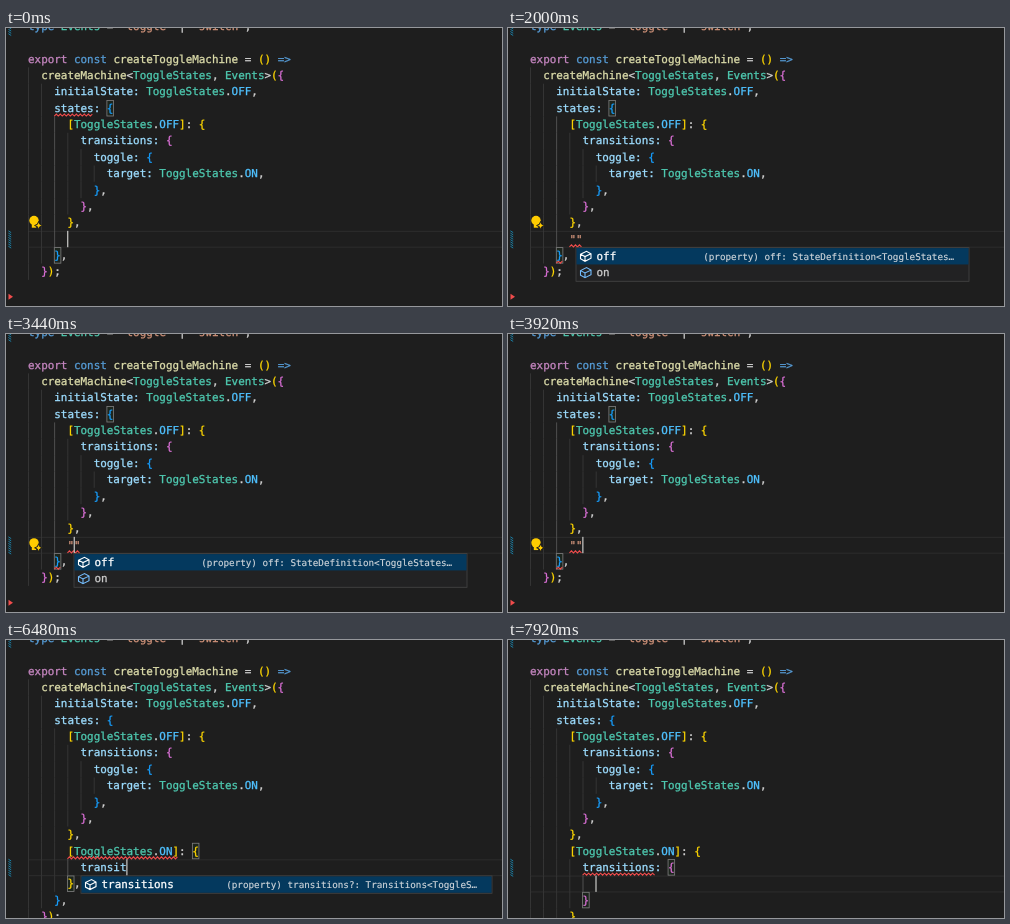
An HTML page that plays this animation: 496 px wide and 278 px high, repeating every 8 s.

```html
<!DOCTYPE html>
<html lang="en">
<head>
<meta charset="utf-8">
<title>Toggle machine editor</title>
<style>
  html, body { margin: 0; width: 100%; height: 100%; overflow: hidden; background: #1e1e1e; }
  svg { display: block; width: 496px; height: 278px; }
  text { font: 10.92px "DejaVu Sans Mono", monospace; white-space: pre; text-rendering: geometricPrecision; }
  text, tspan { fill: currentColor; stroke: currentColor; stroke-width: .3px; }
  .detail { font-size: 9.28px; text-anchor: end; stroke-width: .15px; }
</style>
</head>
<body>
<svg id="stage" viewBox="0 0 496 278"></svg>
<script>
const LOOP = 8000, LEFT = 22, TOP = 23, CHAR = 6.575, LINE = 16.35, BASELINE = 11.7, EDIT_ROW = 11;
const BRACKETS = ["#ffd700", "#da70d6", "#179fff"];
const COLORS = {
  export: "#c586c0", const: "#569cd6", type: "#569cd6", "=>": "#569cd6",
  createToggleMachine: "#dcdcaa", createMachine: "#dcdcaa",
  ToggleStates: "#4ec9b0", Events: "#4ec9b0", OFF: "#4fc1ff", ON: "#4fc1ff",
};
const HEAD = [
  "export const createToggleMachine = () =>",
  "  createMachine<ToggleStates, Events>({",
  "    initialState: ToggleStates.OFF,",
  "    states: {",
  "      [ToggleStates.OFF]: {",
  "        transitions: {",
  "          toggle: {",
  "            target: ToggleStates.ON,",
  "          },",
  "        },",
  "      },",
];
const TAIL = ["    },", "  });"];

const blank = n => " ".repeat(n);
const onState = (...body) => ["      [ToggleStates.ON]: {", ...body, "      },"];
const stateMenu = { x: 68, y: 219.6, w: 393, items: ["off", "on"],
  detail: "(property) off: StateDefinition<ToggleStates…" };
const fieldMenu = { x: 75, y: 235.9, w: 411, items: ["transitions"],
  detail: "(property) transitions?: Transitions<ToggleS…" };
const quoteErrors = [[11, 6, 2], [12, 4, 1]];
const stateError = [[11, 6, 17]];

// Each step: start time, edited lines, cursor [line, column], extras.
const steps = [
  [0, [blank(6)], [0, 6], { bulb: 10, errors: [[3, 4, 6]] }],
  [960, ['      ""'], [0, 7], { bulb: 10, errors: [[3, 4, 6]] }],
  [1200, ['      ""'], [0, 7], { bulb: 10, menu: stateMenu }],
  [1360, ['      ""'], [0, 7], { bulb: 10, menu: stateMenu, errors: quoteErrors }],
  [2400, ['      ""'], [0, 7], { bulb: 11, menu: stateMenu, errors: quoteErrors }],
  [3680, ['      ""'], [0, 8], { bulb: 11, errors: quoteErrors }],
  [4160, ['      "'], [0, 7], { bulb: 11, errors: quoteErrors }],
  [4320, [blank(6)], [0, 6], {}],
  ...["", "Tog", "ToggleSt", "ToggleStates", "ToggleStates.ON"].map((s, i) =>
    [4480 + i * 80, [`      [${s}]`], [0, 7 + s.length], {}]),
  [4960, ["      [ToggleStates.ON]: {}"], [0, 26], { errors: stateError }],
  [5040, ["      [ToggleStates.ON]: {", blank(8), "      }"], [2, 7], { errors: stateError }],
  [5120, onState(blank(8)), [2, 8], { errors: stateError }],
  [5680, onState(blank(8)), [1, 8], { errors: stateError }],
  ...[1, 2, 4, 5, 7, 8, 9, 10, 11].map((n, i) =>
    [6080 + i * 90, onState(blank(8) + "transitions".slice(0, n)), [1, 8 + n],
      { errors: stateError, menu: i > 1 ? fieldMenu : null }]),
  [6960, onState("        transitions"), [1, 19], { errors: stateError }],
  [7120, onState("        transitions:"), [1, 20], { errors: stateError }],
  [7360, onState("        transitions: "), [1, 21], { errors: stateError }],
  [7440, onState("        transitions: {}"), [1, 22], { errors: [[12, 8, 11]] }],
  [7680, onState("        transitions: {", blank(10), "        }"), [2, 10], { errors: [[12, 8, 11]] }],
];

const xAt = col => LEFT + col * CHAR;
const yAt = row => TOP + row * LINE;
const rect = (x, y, w, h, fill, more = "") =>
  `<rect x="${x}" y="${y}" width="${w}" height="${h}" fill="${fill}" ${more}/>`;
const escapeText = s => s.replace(/&/g, "&amp;").replace(/</g, "&lt;");
const textAt = (x, y, content, more = "") => `<text x="${x}" y="${y}" ${more}>${content}</text>`;

function tokenColor(token, line) {
  if (COLORS[token]) return COLORS[token];
  if (token[0] === '"') return "#ce9178";
  if (token === "transitions" && !line.includes(":")) return "#d4d4d4";
  return /^\w/.test(token) || (token === ":" && !line.includes("]")) ? "#9cdcfe" : "#d4d4d4";
}

function highlight(lines, firstRow = 0) {
  const open = [], pairs = [];
  const texts = lines.map((line, row) => {
    let col = 0;
    const spans = line.match(/"[^"]*"?|\w+|=>|\s+|./g).map(token => {
      let color = tokenColor(token, line);
      if (/^[[({]$/.test(token)) {
        color = BRACKETS[open.length % 3];
        open.push([row, col]);
      } else if (/^[\])}]$/.test(token)) {
        pairs.push([open.pop(), [row, col]]);
        color = BRACKETS[open.length % 3];
      }
      col += token.length;
      return `<tspan color="${color}">${escapeText(token)}</tspan>`;
    });
    return textAt(LEFT, yAt(firstRow + row) + BASELINE, spans.join(""));
  });
  return { code: texts.join(""), pairs };
}

function guides(lines, pair) {
  let out = "";
  lines.forEach((line, row) => {
    const indent = line.match(/^ */)[0].length;
    for (let col = 0; col < indent; col += 2) {
      const active = pair && row > pair[0][0] && row < pair[1][0] && col === pair[1][1];
      out += rect(xAt(col), yAt(row), 0.8, LINE, active ? "#5c5c5c" : "#3a3a3a");
    }
  });
  return out;
}

function squiggle([row, col, length]) {
  const y = yAt(row) + 15;
  let d = "";
  for (let x = 0, i = 0; x <= length * CHAR; x += 2, i++)
    d += `${i ? "L" : "M"}${xAt(col) + x} ${y + (i % 2 ? -1 : 1)}`;
  return `<path d="${d}" fill="none" stroke="#f14c4c" stroke-width="1.1"/>`;
}

function gutterMark(row) {
  let d = "";
  for (let y = 0; y < LINE; y += 2.2) d += `M2.4 ${yAt(row) + y}l2.8 1.8`;
  return `<path d="${d}" stroke="#1b81a8" stroke-width="1"/>`;
}

function bulb(row) {
  const y = yAt(row) + 6;
  return `<g transform="translate(28 ${y})" fill="#ffcc00">
    <circle r="4.7"/><path d="M-2.2 3h4.4v4.2h-4.4z"/>
    <path d="M4.6 1l1.2 2.8 2.8 1.2-2.8 1.2-1.2 2.8-1.2-2.8-2.8-1.2 2.8-1.2z" stroke="#1e1e1e"/></g>`;
}

function menuBox({ x, y, w, items, detail }) {
  let out = rect(x, y, w, items.length * LINE + 1, "#222223", 'stroke="#454545" stroke-width=".8"');
  out += rect(x + 0.5, y + 0.5, w - 1, LINE, "#04395e");
  items.forEach((label, i) => {
    const mid = y + 0.5 + (i + 0.5) * LINE;
    out += `<path transform="translate(${x + 9.5} ${mid})" fill="none" stroke="${i ? "#75beff" : "#ffffff"}"
      stroke-width="1.1" d="M-5 -2L1 -5L5.5 -2.5V2L-.5 5L-5 2.5ZM-5 -2L-.5 .3L5.5 -2.5M-.5 .3V5"/>`;
    out += textAt(x + 20.5, mid + 3.5, label, `color="${i ? "#cccccc" : "#ffffff"}"`);
  });
  return out + textAt(x + w - 14.8, y + 12.2, escapeText(detail), 'class="detail" color="#d0d6db"');
}

const isBefore = (a, b) => a[0] < b[0] || (a[0] === b[0] && a[1] < b[1]);

function draw([, edit, [line, col], { bulb: bulbRow, menu, errors = [] }], cursorOn) {
  const lines = [...HEAD, ...edit, ...TAIL];
  const row = EDIT_ROW + line, cursor = [row, col];
  const { code, pairs } = highlight(lines);
  const pair = pairs.find(([a, b]) => isBefore(a, cursor) && !isBefore(b, cursor));
  const markedRow = edit.length > 1 ? EDIT_ROW + 1 : EDIT_ROW;
  const deletedY = yAt(lines.length + 1) + 0.6;

  let out = rect(0, 0, 496, 278, "#1e1e1e");
  out += rect(LEFT, yAt(row), 474, 1.2, "#2a2a2a") + rect(LEFT, yAt(row + 1) - 0.6, 474, 1.2, "#2a2a2a");
  out += guides(lines, pair);
  for (const [r, c] of pair || [])
    out += rect(xAt(c), yAt(r) + 0.4, CHAR, LINE - 0.8, "#1d251d", 'stroke="#808080" stroke-width=".8"');
  out += highlight(['type Events = "toggle" | "switch";'], -2).code;
  out += code + errors.map(squiggle).join("");
  out += gutterMark(-2) + gutterMark(markedRow);
  out += `<path d="M2.5 ${deletedY - 3}l4.5 3l-4.5 3z" fill="#f14c4c"/>`;
  if (bulbRow) out += bulb(bulbRow);
  if (cursorOn) out += rect(xAt(col) - 0.4, yAt(row), 1.3, LINE, "#bdbdbb");
  if (menu) out += menuBox(menu);
  return out;
}

const stage = document.getElementById("stage");
let shown = "";
function tick() {
  const time = performance.now() % LOOP;
  const index = steps.findLastIndex(step => step[0] <= time);
  const cursorOn = (time - steps[index][0]) % 1000 < 500;
  const key = `${index} ${cursorOn}`;
  if (key !== shown) {
    stage.innerHTML = draw(steps[index], cursorOn);
    shown = key;
  }
  requestAnimationFrame(tick);
}
tick();
</script>
</body>
</html>
```
